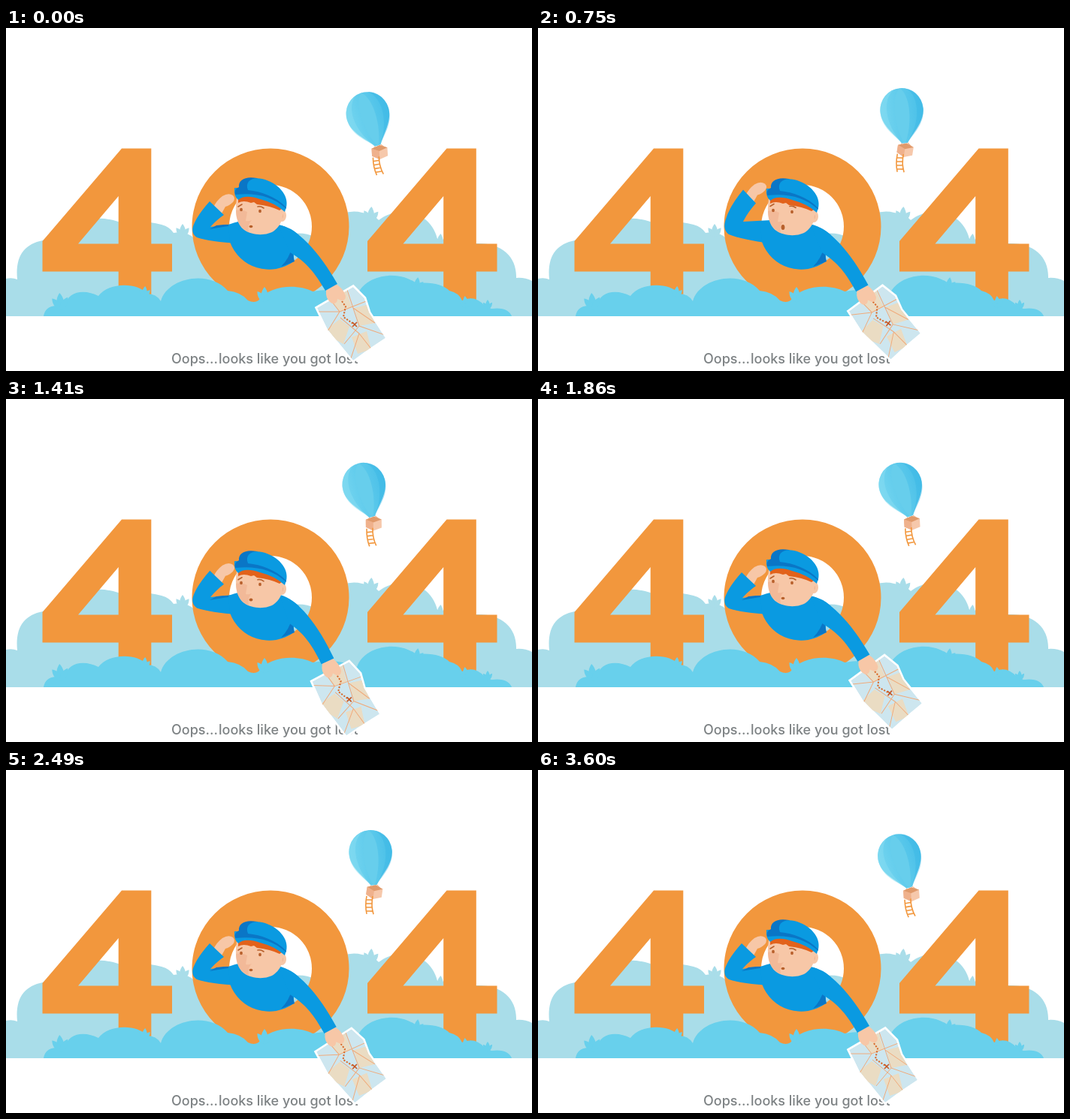
Recreate the animation shown at these times as an HTML page. Size 700 px wide and 457 px high, loop 3.63 s.

```html
<!DOCTYPE html>
<html lang="en">
<head>
<meta charset="utf-8">
<title>404</title>
<style>
  html, body { margin: 0; width: 100%; height: 100%; overflow: hidden; background: #fff; }
  svg { display: block; width: 700px; height: 457px; }
  .orange { fill: #f2973d; }
  .back { fill: #a9dde9; }
  .front { fill: #68d0ec; }
  .blue { fill: #0a9ae1; }
  .navy { fill: #0a76c6; }
  .skin { fill: #f7c7a7; }
  .shade { fill: #efb291; }
  .hair { fill: #e2621b; }
  .brown { fill: #b8602c; }
  .line { fill: none; stroke: #f0ab7c; stroke-width: 1; }
  text { font: 500 18px Inter, sans-serif; fill: #7d8284; }
</style>
</head>
<body>
<svg viewBox="0 0 700 457">
  <defs>
    <path id="four" fill-rule="evenodd" d="M154 160.5H193.3V287.5H221V324.5H193.3V375H149.7V324.5H48.5V284ZM149.7 224L96 287.5H149.7Z"/>
    <path id="leaf" d="M0 2C-7 -5 -5 -14 0 -20C5 -14 7 -5 0 2Z"/>
    <g id="plant">
      <use href="#leaf"/>
      <use href="#leaf" transform="rotate(-36) scale(.85)"/>
      <use href="#leaf" transform="rotate(36) scale(.85)"/>
    </g>
    <path id="sheet" d="M414 373L462 345L477 360L483 379L505 413L484 427L462 443L439 415L428 402Z"/>
    <clipPath id="sheetClip"><use href="#sheet"/></clipPath>
    <linearGradient id="sky">
      <stop stop-color="#74d5ef"/><stop offset="1" stop-color="#48bfe8"/>
    </linearGradient>
  </defs>

  <g class="back">
    <path d="M0 384V334Q8 332 15 335C12 304 24 288 49 283L72 264C92 253 130 249 154 260Q181 255 207 262Q218 265 223 273Q240 270 250 280L345 290Q382 264 412 279L430 260Q450 240 474 246Q490 248 496 256C521 236 565 243 574 281Q600 285 626 287C660 286 680 305 679 333Q690 332 700 337V384Z"/>
    <g id="backPlants"></g>
  </g>

  <g id="balloon">
    <path fill="url(#sky)" d="M-28.7 0A28.7 29.5 0 0 1 28.7 0C28.7 18 12 31 4 44H-4C-12 31 -28.7 18 -28.7 0Z"/>
    <path fill="#86dcf2" opacity=".55" d="M-8 -28C-25 -17 -24 17 -4 43C-18 28 -28.7 18 -28.7 0C-28.7 -14 -19 -25 -8 -28Z"/>
    <path fill="#67ceec" d="M0 -29.5C-14 -18 -12 20 -1 44H1C12 20 14 -18 0 -29.5Z"/>
    <path fill="#39b4e4" opacity=".4" d="M9 -28C25 -16 24 17 4 43C18 28 28.7 18 28.7 0C28.7 -14 20 -25 9 -28Z"/>
    <path class="line" stroke="#74c8e6" d="M-4 44L-7 50M4 44L8 49"/>
    <g transform="translate(1 46) rotate(14)">
      <path fill="#f6c8ab" d="M-10 2L1 -2L11 2V13L0 17L-10 12Z"/>
      <path fill="#efb18c" d="M-10 2L0 6V17L-10 12Z"/>
      <path fill="#e09a6b" d="M-10 2L1 -2L11 2L0 6Z"/>
    </g>
    <path transform="translate(-7 58) rotate(8)" fill="none" stroke="#f2973d" stroke-width="1.6" d="M-4 0Q-6 13 -3 24M4 0Q2 13 6 24M-4 5H4M-4 10H3M-4 15H3M-4 20H4"/>
  </g>

  <g class="orange">
    <use href="#four"/><use href="#four" x="432.5"/>
    <path fill-rule="evenodd" d="M247.5 264.5A104.5 104 0 0 1 456.5 264.5A104.5 104 0 0 1 247.5 264.5ZM297 264.5A55 55.5 0 0 0 407 264.5A55 55.5 0 0 0 297 264.5Z"/>
  </g>

  <g class="front">
    <path d="M50 384Q52 371 66 370L78 371C82 349 106 348 123 357C136 339 174 338 188 354Q200 354 206 364C214 333 270 321 295 350Q313 352 322 363Q330 367 336 363C350 343 387 340 408 351Q440 345 467 357C477 328 523 322 545 340Q577 337 590 350Q603 353 607 363Q624 355 637 370L646 374Q668 371 673 384Z"/>
    <g id="frontPlants"></g>
  </g>

  <text y="447"><tspan x="220">Oops...</tspan><tspan x="283">looks like you got lost</tspan></text>

  <path id="hand" class="skin" d="M275 239Q279 230 287 224Q295 219 301 223Q305 227 301 232Q296 237 291 238L286 247Z"/>
  <path id="sleeve" class="blue"/>
  <path id="elbow" class="navy" d="M271 268L280 263Q295 261 310 262Q288 265 271 268Z"/>
  <path class="blue" d="M296 262Q325 250 362 262Q380 266 390 276L383 299V311A55.5 55.5 0 0 1 298 285Z"/>
  <path class="navy" d="M380 293L384 311L366 318Q377 307 380 293Z"/>

  <g id="arm">
    <g id="map">
      <use href="#sheet" fill="#fff" stroke="#fff" stroke-width="5"/>
      <g clip-path="url(#sheetClip)">
        <use href="#sheet" fill="#cde6ef"/>
        <path fill="#eadcc3" d="M432 362L453 350L460 372L444 378ZM428 401L444 388L457 398L449 421L438 415ZM464 373L480 369L491 393L470 397ZM460 412L480 404L486 428L468 434Z"/>
        <path class="line" d="M412 378L444 378L487 361M430 360L444 378L428 404M453 346L462 373L470 397L510 411M445 386L470 407L459 440M470 397L450 421M470 407L488 430M462 373L491 393"/>
      </g>
      <path fill="none" stroke="#d96a2b" stroke-width="2" stroke-dasharray="2.2 1.8" d="M447 364L452 371L449 385L462 394"/>
      <path stroke="#c65420" stroke-width="1.6" d="M461 392L467 398M467 392L461 398"/>
    </g>
    <path class="skin" d="M426 348L439 341Q449 347 452 357Q452 364 446 363L441 361Q441 368 434 367Q427 363 426 355Z"/>
    <path class="blue" d="M362 262C386 265 417 298 441 341L425 350C411 326 400 312 378 299Z"/>
  </g>

  <g id="head">
    <ellipse class="skin" cx="367" cy="250" rx="6" ry="8"/>
    <path class="shade" d="M365 247Q371 247 368 254Q367 251 365 247Z"/>
    <path class="skin" d="M307 226C304 246 307 262 317 269C328 277 348 277 357 270C367 262 370 252 367 236L340 220Z"/>
    <path class="shade" opacity=".65" d="M306 243Q314 241 321 245L319 257Q323 258 327 256Q321 262 323 272C309 265 306 254 306 243Z"/>
    <path id="brows" fill="none" stroke="#b8602c" stroke-width="1.6" stroke-linecap="round" d="M309 238L314 235M335 238Q339 237 343 240"/>
    <ellipse class="brown" cx="313" cy="242" rx="1.9" ry="2.2"/>
    <ellipse class="brown" cx="338" cy="244" rx="1.9" ry="2.2"/>
    <ellipse id="mouth" class="brown" cx="326" cy="264.5" rx="2.4"/>
    <path class="hair" d="M309 222L340 222L367 241L364 243Q352 237 334 235L330 232L326 233Q316 229 309 233Z"/>
    <path class="blue" d="M304 213Q303 224 309 229Q318 221 338 228Q358 233 371 245Q374 238 372 229L340 212Z"/>
    <path class="navy" d="M310 212C309 202 319 197 334 200L372 230L373 241C355 224 332 219 305 222Q303 215 310 212Z"/>
    <path class="blue" d="M322 216C318 206 325 198 341 201C362 206 377 223 373 239C358 224 340 218 322 216Z"/>
  </g>
</svg>
<script>
const LOOP = 3630, TAU = Math.PI * 2;
const $ = id => document.getElementById(id);
const set = (id, name, value) => $(id).setAttribute(name, value);

// Eased value at time t through [time, value] pairs.
function ease(t, keys) {
  const i = keys.findIndex(k => k[0] > t);
  const [t0, a] = keys[i - 1], [t1, b] = keys[i];
  const p = (t - t0) / (t1 - t0);
  return a + (b - a) * p * p * (3 - 2 * p);
}
const times = [0, 750, 1410, 1860, 2490, 3030, LOOP];
const track = (...values) => values.map((v, i) => [times[i], v]);

const armTurn = track(0, 1.5, 4.5, -.4, 1.3, .7, 0);
const mapTurn = track(0, -8, -2.5, -5.5, -4, -.7, 0);
const headDrop = track(0, 1, 3, 1, 2, 1, 0);
const surprise = [[0, 0], [250, 0], [650, 1], [950, 1], [1420, .15], [1650, 0], [LOOP, 0]];

function addPlants(id, spots) {
  $(id).innerHTML = spots.map(([x, y, turn, size]) =>
    `<g transform="translate(${x} ${y}) rotate(${turn}) scale(${size})"><use href="#plant"/></g>`).join('');
}
addPlants('backPlants', [[235, 278, 0, .85], [485, 257, 4, .95], [577, 291, 5, .85]]);
addPlants('frontPlants', [[73, 374, -5, 1.05], [184, 358, 5, .7], [344, 364, 0, .95],
  [546, 348, 8, .8], [612, 372, -5, .75], [641, 374, 0, .6]]);

function draw(t) {
  const a = t / LOOP * 2 * TAU;
  const x = 481.4 + 5.2 * Math.sin(a);
  const y = 112.3 + 2.8 * Math.cos(a + .63);
  const tilt = -11.5 - 6.5 * Math.cos(a + .31);
  set('balloon', 'transform', `translate(${x} ${y}) rotate(${tilt})`);

  set('arm', 'transform', `rotate(${ease(t, armTurn)} 380 285)`);
  set('map', 'transform', `rotate(${ease(t, mapTurn)} 440 358)`);
  set('head', 'transform', `translate(0 ${ease(t, headDrop)})`);

  const u = ease(t, surprise), up = 15.5 * u;
  set('hand', 'transform', `translate(1 ${-up})`);
  set('sleeve', 'd', `M${271 + 2 * u} ${231 - up}L290 ${249 - up}
    Q${281 - 2 * u} ${255 - up * .6} ${272 + u} ${265 - 7 * u}L310 ${261 - 5 * u}V287
    Q272 ${285 - 3 * u} 254 ${279 - 4 * u}Q246 ${274 - 5 * u} 249 ${264 - 6 * u}
    Q${254 - u} ${250 - 10 * u} ${271 + 2 * u} ${231 - up}Z`);
  set('elbow', 'opacity', 1 - u);
  set('brows', 'transform', `translate(0 ${-1.5 * u})`);
  set('mouth', 'ry', 1.8 + 1.8 * u);
}

function frame() {
  draw(performance.now() % LOOP);
  requestAnimationFrame(frame);
}
frame();
</script>
</body>
</html>
```
